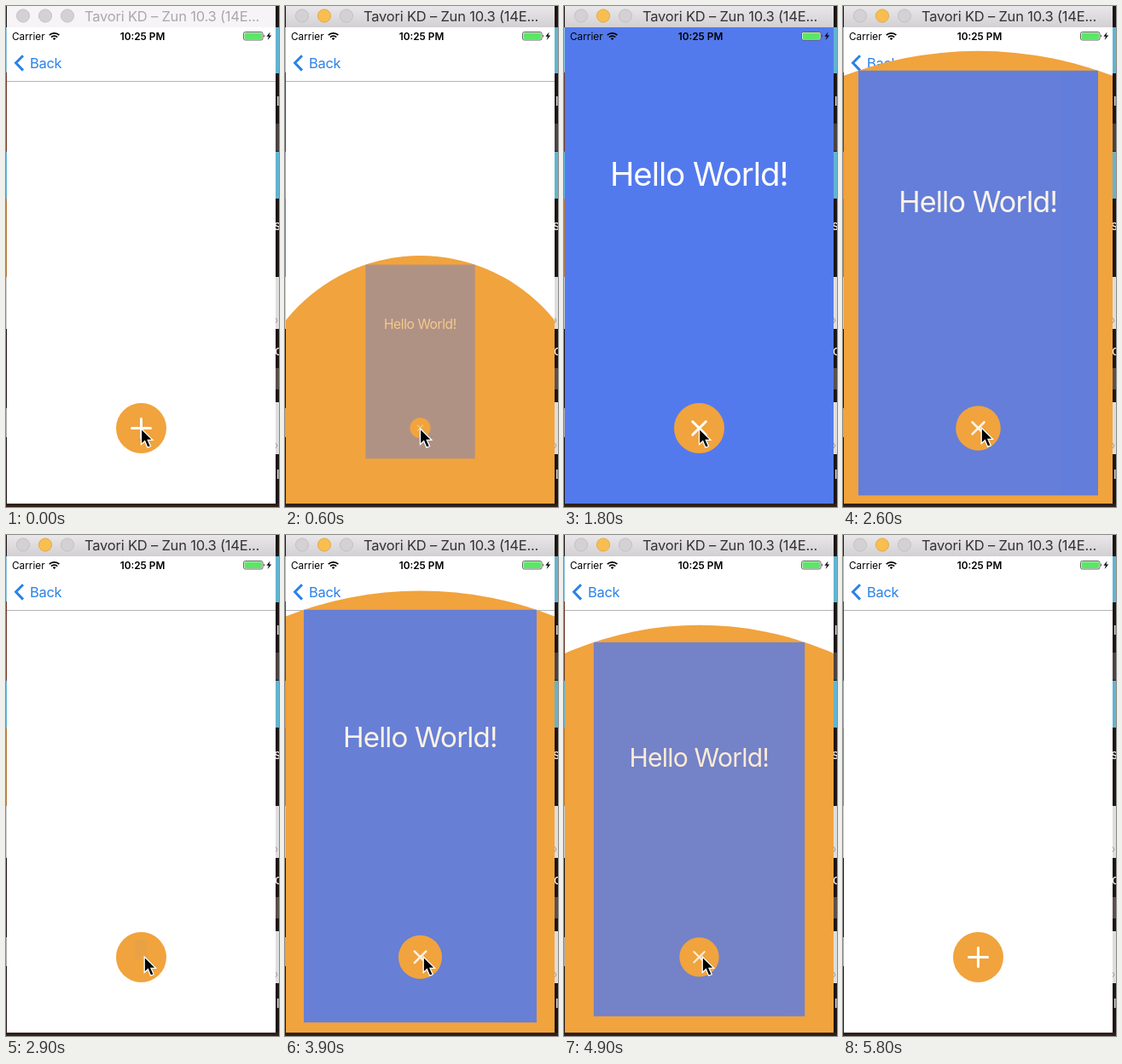
Write an HTML page that moves like this. It is 320x588 px and loops after 5.9 s.

```html
<!DOCTYPE html>
<html lang="en">
<head>
<meta charset="utf-8">
<title>Bubble transition</title>
<style>
  html, body { margin: 0; width: 100%; height: 100%; overflow: hidden; background: #1d1614; }
  svg { display: block; width: 320px; height: 588px; font-family: Inter, Roboto, sans-serif; }
  .desk text { font-size: 15px; fill: #fff; }
  .line { fill: none; stroke-linecap: round; }
</style>
</head>
<body>
<svg viewBox="0 0 320 588">
  <defs>
    <linearGradient id="bar" x2="0" y2="1">
      <stop stop-color="#e9e7e9"/><stop offset="1" stop-color="#d2d0d2"/>
    </linearGradient>
    <clipPath id="screen"><rect x="1" y="25" width="315" height="559"/></clipPath>
    <path id="plus" d="M-11 0H11M0 -11V11" class="line" stroke="#fff" stroke-width="3"/>
  </defs>

  <!-- desktop behind the window -->
  <g class="desk">
    <rect width="320" height="588" fill="#1d1614"/>
    <g id="strips"></g>
    <text x="317" y="117">l</text>
    <text x="314" y="263">s</text>
    <text x="315" y="410">c</text>
    <text x="317" y="555">l</text>
    <path d="M316 366l2 3-2 3M316 513l2 3-2 3" class="line" stroke="#999"/>
    <rect y="584" width="320" height="4" fill="#30201a"/>
  </g>

  <!-- window -->
  <rect id="title" x="1" width="315" height="25"/>
  <g stroke="#bdbbbd" stroke-width=".8" fill="#d3d1d3">
    <circle cx="20" cy="11.5" r="7.6"/>
    <circle id="amber" cx="46" cy="11.5" r="7.6"/>
    <circle cx="72" cy="11.5" r="7.6"/>
  </g>
  <text id="name" x="92" y="17.5" font-size="16.5" letter-spacing="-.2">Tavori KD – Zun 10.3 (14E...</text>

  <g clip-path="url(#screen)">
    <rect x="1" y="25" width="315" height="559" fill="#fff"/>
    <path d="M20 58.2L11.6 66.8L20 75.6" fill="none" stroke="#2b82e8" stroke-width="3"/>
    <text x="28" y="72.8" font-size="16.5" letter-spacing="-.3" fill="#2b82e8">Back</text>
    <path d="M1 88.5H316" stroke="#b4b4b4"/>
    <circle cx="158.5" cy="495.5" r="29.5" fill="#f1a33d"/>
    <use href="#plus" x="158.5" y="495.5"/>

    <circle id="bubble" cx="158.5" cy="495" fill="#f1a33d"/>
    <g id="page">
      <rect x="1" y="25" width="315" height="559" fill="#537aed"/>
      <text x="158.2" y="211" font-size="38.3" letter-spacing="-1" text-anchor="middle" fill="#fff">Hello World!</text>
      <circle cx="158.5" cy="495.5" r="29.5" fill="#f1a33d"/>
      <use href="#plus" transform="translate(158.5 495.5) rotate(45)"/>
    </g>

    <!-- status bar -->
    <text x="7" y="39.8" font-size="11.8">Carrier</text>
    <text x="160" y="39.8" font-size="11.8" font-weight="600" text-anchor="middle">10:25 PM</text>
    <g fill="none" stroke="#000" stroke-width="1.7">
      <path d="M50.8 34.2a8.2 8.2 0 0 1 11.6 0M53 36.7a5 5 0 0 1 7.2 0"/>
      <path d="M56.6 40l-1.8-1.8a2.6 2.6 0 0 1 3.6 0z" fill="#000" stroke="none"/>
    </g>
    <rect x="278.5" y="30.5" width="22.5" height="9.5" rx="2" fill="#fff" stroke="#555" stroke-width=".9"/>
    <rect x="279.6" y="31.6" width="20.3" height="7.3" rx="1" fill="#5be667"/>
    <path d="M302 33.6q2 1.6 0 3.4z" fill="#444"/>
    <path d="M309.6 30.5l-4.2 5.2h2.6l-1.4 4.3 4.6-5.6h-2.8z"/>
  </g>

  <path id="cursor" d="M0 0V18.6L4.2 14.7L7.4 22.2L11 20.7L7.8 13.4H13.4Z" stroke="#fff" stroke-width="1.3"/>
</svg>

<script>
const LOOP = 5900, STEP = 100, FADE = 480;
const OPENS = [386, 3542], CLOSES = [2490, 4746];
const CX = 158.5, CY = 495, RADIUS = 495.7;
const $ = id => document.getElementById(id);
const set = (id, attrs) => {
  for (const key in attrs) $(id).setAttribute(key, attrs[key]);
};

// x, width, top, bottom, colour
const strips = [
  [0, 1, 25, 78, '#8fc6dc'], [0, 1, 78, 171, '#6b3a2c'], [0, 1, 171, 226, '#62b4d0'],
  [0, 1, 226, 318, '#b87a3c'], [0, 1, 318, 379, '#c9ccca'], [0, 1, 472, 506, '#aaa'],
  [316, 4, 25, 79, '#62b4d0'], [316, 4, 138, 170, '#4b4442'], [316, 4, 171, 226, '#62b4d0'],
  [316, 4, 318, 379, '#dedede'], [316, 4, 425, 450, '#5c504b'], [316, 4, 465, 526, '#dedede']
];
$('strips').innerHTML = strips.map(([x, w, top, bottom, fill]) =>
  `<rect x="${x}" y="${top}" width="${w}" height="${bottom - top}" fill="${fill}"/>`).join('');

// cubic-bezier(.42, 0, .58, 1)
function ease(x) {
  if (x <= 0 || x >= 1) return x <= 0 ? 0 : 1;
  let low = 0, high = 1, u;
  for (let i = 0; i < 24; i++) {
    u = (low + high) / 2;
    const v = 1 - u;
    if (1.26 * v * v * u + 1.74 * v * u * u + u * u * u < x) low = u;
    else high = u;
  }
  return u * u * (3 - 2 * u);
}

function draw(t) {
  const progress = start => ease((t - start) / FADE);
  const sum = starts => starts.reduce((total, start) => total + progress(start), 0);
  const s = Math.max(0, sum(OPENS) - sum(CLOSES));
  set('bubble', { r: RADIUS * s });
  set('page', {
    transform: `translate(${CX} ${CY}) scale(${s}) translate(${-CX} ${-CY})`,
    opacity: s
  });

  const active = t >= 300;
  set('title', { fill: active ? 'url(#bar)' : '#f6f4f6' });
  set('name', { fill: active ? '#333' : '#aaa8aa' });
  set('amber', active ? { fill: '#f8be4f', stroke: '#dfa23a' } : { fill: '#d3d1d3', stroke: '#bdbbbd' });

  const shift = ease((t - 2000) / 300);
  set('cursor', {
    transform: `translate(${158.5 + 3.7 * shift} ${496 - shift})`,
    visibility: t < 5500 ? 'visible' : 'hidden'
  });
}

const begin = performance.now();
function tick() {
  const t = (performance.now() - begin) % LOOP;
  draw(Math.floor(t / STEP) * STEP);
  requestAnimationFrame(tick);
}
tick();
</script>
</body>
</html>
```
